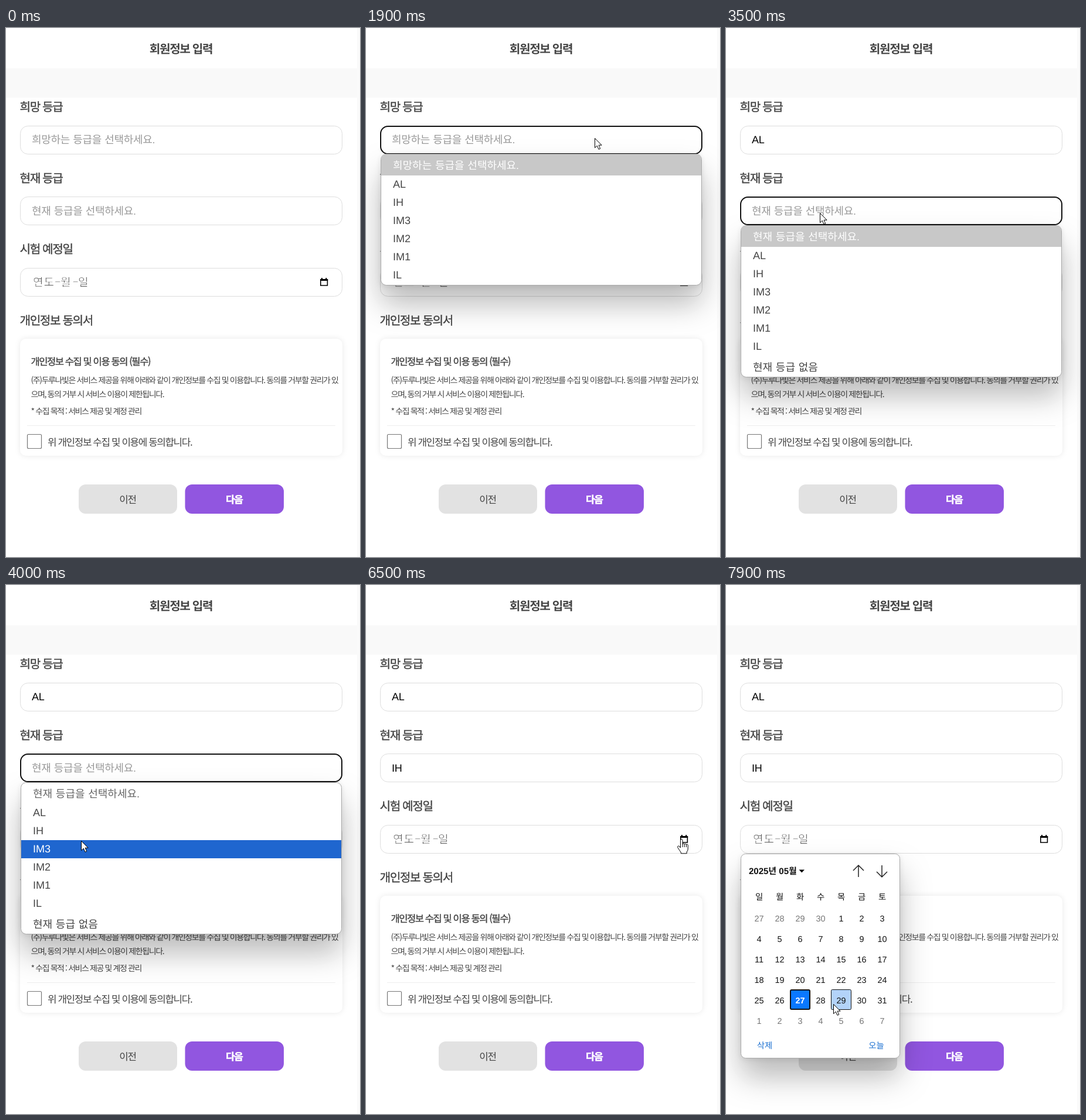
Animation, 604 px wide and 904 px high, one loop 8000 ms. Source, as an HTML page:

```html
<!DOCTYPE html>
<html lang="ko">
<head>
<meta charset="utf-8">
<style>
html, body { margin: 0; width: 100%; height: 100%; overflow: hidden; background: #fff; }
svg { display: block; width: 604px; height: 904px; }
text { font-family: "Noto Sans CJK KR", "Noto Sans CJK JP", "Noto Sans CJK", "Noto Sans", sans-serif; fill: #444; white-space: pre; text-rendering: geometricPrecision; }
.tight { letter-spacing: -1.4px; }
.head { font-size: 20.2px; }
.sub { font-size: 16.5px; }
.medium { stroke: #444; stroke-width: .4px; }
.bold { font-weight: 700; }
.body { font-size: 14px; }
.label { font-size: 16.9px; }
.ui { font-family: "Liberation Sans", "Noto Sans CJK KR", "Noto Sans CJK JP", "Noto Sans CJK", sans-serif; font-size: 18px; }
.value { letter-spacing: -.3px; word-spacing: .5px; }
.option { word-spacing: .7px; }
.thin { font-size: 19px; font-weight: 100; fill: #333; stroke: #fff; stroke-width: .7px; }
.day { font-size: 14.4px; fill: #111; text-anchor: middle; }
.popup { filter: drop-shadow(0 32px 26px rgba(0,0,0,.25)) drop-shadow(0 2px 5px rgba(0,0,0,.1)); }
</style>
</head>
<body>
<svg id="stage" viewBox="0 0 604 904"></svg>
<script>
const LOOP = 8000, STEP = 100;
const BLUE = '#1f66cf';
const GRADES = ['AL', 'IH', 'IM3', 'IM2', 'IM1', 'IL'];

const text = (x, y, cls, str, extra = '') =>
  `<text x="${x}" y="${y}" class="${cls}" ${extra}>${str}</text>`;
const rect = (x, y, w, h, r, fill, extra = '') =>
  `<rect x="${x}" y="${y}" width="${w}" height="${h}" rx="${r}" fill="${fill}" ${extra}/>`;

// The normal border is 1px and the focus ring 2px, both inside the same box.
const field = (id, y) =>
  rect(24.5, y + .5, 549, 48, 13, '#fff', 'stroke="#ddd"') +
  rect(25, y + 1, 548, 47, 12.5, '#fff', `id="${id}-ring" stroke="#111" stroke-width="2" visibility="hidden"`);

// Option rows: a tall prompt row, then grades 31px apart.
function dropdown(id, top, height, prompt, last) {
  const options = GRADES.map((g, i) =>
    text(46, top + 57.5 + 31 * i, 'ui option', g, `id="${id}-row${i}"`)).join('');
  return `<g id="${id}"><g class="popup">${rect(25.5, top + .5, 547, height, 9, '#fff', 'stroke="#aaa"')}</g>
    <path id="${id}-idle" fill="#c8c8c8" d="M26 ${top + 37}v-28q0-8 8-8h530q8 0 8 8v28z"/>
    ${rect(26, 0, 546, 31, 0, BLUE, `id="${id}-hover"`)}
    ${text(46, top + 26, 'ui option', prompt, `id="${id}-prompt"`)}${options}
    ${last ? text(46, top + 248.5, 'ui option', last) : ''}</g>`;
}

function calendar() {
  const col = i => 56.5 + 35 * i;
  let cells = [...'일월화수목금토'].map((d, i) => text(col(i), 538, 'ui day', d)).join('');
  for (let i = 0; i < 42; i++) {
    const n = i - 3, inMonth = n > 0 && n < 32;
    const day = n < 1 ? n + 30 : n > 31 ? n - 31 : n;
    const style = n === 27 ? 'fill:#fff;font-weight:700' : inMonth ? '' : 'fill:#757575';
    cells += text(col(i % 7), 575 + 35 * Math.floor(i / 7), 'ui day', day, `style="${style}"`);
  }
  return `<g id="cal"><g class="popup">${rect(25.5, 459.5, 271, 349, 8, '#fff', 'stroke="#aaa"')}</g>
    ${text(39, 493.5, 'ui bold', '2025년 05월', 'style="font-size:15px;fill:#111"')}
    <path d="M124.5 486.5h9.5l-4.7 5z"/>
    <path d="M226 499v-20m-9 9l9-9 9 9M266 479v20m-9-9l9 9 9-9" fill="none" stroke="#222" stroke-width="1.5"/>
    ${rect(0, 0, 34, 34, 2, '#b3d3f9', 'id="cell" stroke="#111"')}
    ${rect(110, 692, 33, 33, 2, '#0a78ff', 'stroke="#111" stroke-width="2"')}
    ${cells}
    ${text(66, 791.5, 'ui day', '삭제', 'style="fill:#1a6fd0"')}${text(256.5, 791.5, 'ui day', '오늘', 'style="fill:#1a6fd0"')}</g>`;
}

document.getElementById('stage').innerHTML = `
  ${rect(0, 0, 604, 904, 0, '#fff')}${rect(0, 69, 604, 50, 0, '#f9f9f9')}${rect(599, 0, 5, 904, 0, '#fafafa')}
  ${text(298.5, 42.5, 'head tight bold', '회원정보 입력', 'text-anchor="middle"')}
  ${text(23.5, 141.5, 'head tight medium', '희망 등급')}
  ${text(23.5, 263.5, 'head tight medium', '현재 등급')}
  ${text(23.5, 384.5, 'head tight medium', '시험 예정일')}
  ${text(23.5, 506.5, 'head tight medium', '개인정보 동의서')}
  ${field('want', 167)}${field('now', 288)}${field('date', 410)}
  ${text(44, 197, 'ui value', '', 'id="want-value"')}
  ${text(44, 319, 'ui value', '', 'id="now-value"')}
  <text class="thin" y="440.5" x="46 64.5 83 93 113.5 123">연도–월–일</text>
  <path d="M536.8 430h11.6v10h-11.6z" fill="none" stroke="#000" stroke-width="1.6"/>
  <path d="M536 429h13.2v3H536zM538 427h2v3h-2zM545.3 427h2v3h-2z"/>
  <g style="filter:drop-shadow(0 0 5px rgba(0,0,0,.09))">${rect(24, 531, 550, 200, 10, '#fff')}</g>
  ${text(42.5, 575.5, 'sub tight medium', '개인정보 수집 및 이용 동의 (필수)')}
  ${text(42.5, 607, 'body tight', '(주)두루나빛은 서비스 제공을 위해 아래와 같이 개인정보를 수집 및 이용합니다. 동의를 거부할 권리가 있')}
  ${text(42.5, 631, 'body tight', '으며, 동의 거부 시 서비스 이용이 제한됩니다.')}
  ${text(42.5, 660, 'body tight', '* 수집 목적 : 서비스 제공 및 계정 관리')}
  ${rect(36, 679, 526, 1, 0, '#eee')}
  ${rect(36.5, 694.5, 24, 24, 2, '#fff', 'stroke="#767676" stroke-width="1.2"')}
  ${text(71, 713.5, 'label tight', '위 개인정보 수집 및 이용에 동의합니다.')}
  ${rect(124, 780, 168, 50, 12, '#e2e2e2')}${rect(305.5, 780, 168.5, 50, 12, '#9156e0')}
  ${text(207.5, 812, 'label tight', '이전', 'text-anchor="middle"')}
  ${text(389.2, 812, 'label tight bold', '다음', 'text-anchor="middle" style="fill:#fff;stroke:#fff;stroke-width:.5px"')}
  ${dropdown('dd1', 215, 224, '희망하는 등급을 선택하세요.')}
  ${dropdown('dd2', 337, 259, '현재 등급을 선택하세요.', '현재 등급 없음')}
  ${calendar()}
  <g id="pointer" fill="#fff" stroke="#000" stroke-linejoin="round">
    <path id="arrow" d="M.5.5v16.2l3.8-3.5 2.7 6.1 2.7-1.1-2.6-6h5z"/>
    <path id="hand" d="M-1.5 14V1.5q0-2 1.8-2t1.8 2V8q0-1.2 1.6-1.2T5.3 8.3q.2-1 1.6-1t1.6 1.6q.2-.9 1.4-.9t1.4 1.8V16q0 3-2 5v2.8H-.6V22q-2.2-3-5.4-8.200q-1-2 .4-2.700t2.600.9zM2.100 8v5M5.300 8.300v4.700M8.500 8.900v4.100"/>
  </g>`;

const $ = id => document.getElementById(id);
const show = (id, on) => $(id).setAttribute('visibility', on ? 'inherit' : 'hidden');

// Pointer stops: time, x, y
const STOPS = [
  [500, 440, 300], [1000, 392, 190], [1900, 390, 188], [2500, 174, 276],
  [2900, 174, 276], [3200, 160, 312], [3500, 160, 316], [4000, 128, 437],
  [4300, 128, 440], [4500, 128, 433], [5000, 128, 433], [5800, 590, 450],
  [6300, 538, 435], [7200, 538, 435], [7800, 183, 716], [8000, 183, 716]
];

function pointerAt(t) {
  const i = Math.max(1, STOPS.findIndex(s => s[0] >= t));
  const [t0, x0, y0] = STOPS[i - 1], [t1, x1, y1] = STOPS[i];
  const p = Math.min(1, Math.max(0, (t - t0) / (t1 - t0)));
  const e = p * p * (3 - 2 * p);
  return [x0 + (x1 - x0) * e, y0 + (y1 - y0) * e];
}

function setField(id, focused, value, prompt) {
  show(id + '-ring', focused);
  $(id + '-value').textContent = value || prompt;
  $(id + '-value').style.fill = value ? '#000' : '#999';
}

function setDropdown(id, open, top, y) {
  const first = top + 37;
  const row = Math.floor((y - first) / 31);
  const over = row >= 0 && row < GRADES.length;
  show(id, open);
  show(id + '-hover', open && over);
  show(id + '-idle', open && !over);
  $(id + '-hover').setAttribute('y', first + 31 * row);
  $(id + '-prompt').style.fill = over ? '#666' : '#fff';
  GRADES.forEach((g, i) => $(`${id}-row${i}`).style.fill = i === row ? '#fff' : '#444');
}

function setCalendar(open, x, y) {
  const c = Math.floor((x - 39) / 35), r = Math.floor((y - 552) / 35);
  show('cal', open);
  show('cell', open && c >= 0 && c < 7 && r >= 0 && r < 6);
  $('cell').setAttribute('x', 39.5 + 35 * c);
  $('cell').setAttribute('y', 551.5 + 35 * r);
}

function render(t) {
  const [x, y] = pointerAt(t);
  const during = (a, b) => t >= a && t < b;
  setField('want', during(1300, 3300), t >= 2800 && 'AL', '희망하는 등급을 선택하세요.');
  setField('now', during(3300, 5100), t >= 4600 && 'IH', '현재 등급을 선택하세요.');
  setDropdown('dd1', during(1300, 2800), 215, y);
  setDropdown('dd2', during(3300, 4600), 337, y);
  setCalendar(t >= 6800, x, y);
  const onIcon = x > 530 && x < 552 && y > 424 && y < 446;
  const visible = t >= 500;
  show('arrow', visible && !onIcon);
  show('hand', visible && onIcon);
  $('pointer').setAttribute('transform', `translate(${Math.round(x)} ${Math.round(y)})`);
}

const start = performance.now();
function tick() {
  const t = (performance.now() - start) % LOOP;
  render(Math.floor(t / STEP) * STEP);
  requestAnimationFrame(tick);
}
tick();
</script>
</body>
</html>
```
